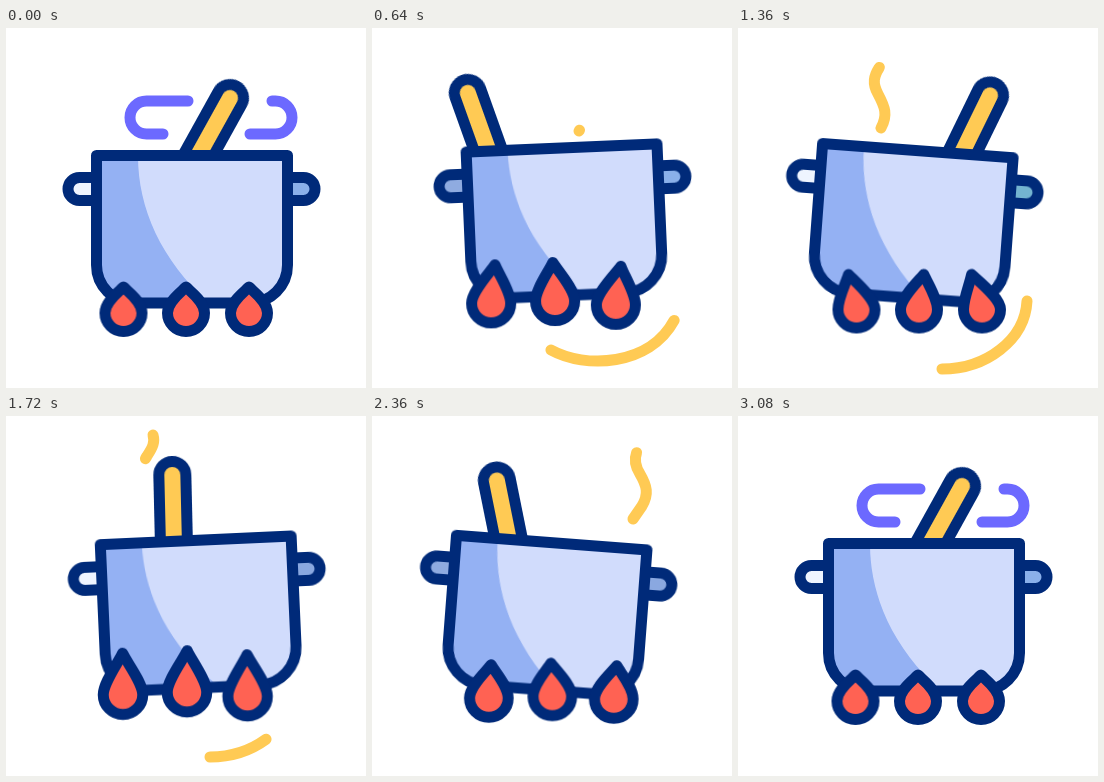
Recreate the animation shown at these times as an HTML page. Size 360 px wide and 360 px high, loop 3140 ms.

```html
<!DOCTYPE html>
<html lang="en">
<head>
<meta charset="utf-8">
<title>Cooking pot</title>
<style>
  html, body { margin: 0; width: 100%; height: 100%; overflow: hidden; background: #fff; }
  svg { display: block; width: 100vw; height: 100vh; }
  svg * {
    animation: 3140ms cubic-bezier(.37, 0, .63, 1) infinite;
  }
  .ink { stroke: #002a79; }
  .line { fill: none; stroke-dasharray: 100 200; stroke-dashoffset: 101; }
  .wisp { stroke: #6c69ff; stroke-dashoffset: 0; }
  .steam { stroke: #ffca54; animation-timing-function: linear; }

  /* Whole scene rising and settling */
  .bob { animation-name: bob; }
  @keyframes bob {
    0%, 7% { transform: translateY(0); }
    12.1% { transform: translateY(-6px); }
    29.3% { transform: translateY(-9px); }
    43.3% { transform: translateY(-4.6px); }
    66.2% { transform: translateY(-1.5px); }
    84.7% { transform: translateY(.4px); }
    94%, 100% { transform: translateY(0); }
  }

  /* Pot swings like a pendulum */
  .pot { animation-name: swing; transform-origin: 186px 45px; }
  @keyframes swing {
    0%, 12.1% { transform: rotate(0deg); }
    28% { transform: rotate(-4.6deg); }
    43.9% { transform: rotate(4.3deg); }
    59.9% { transform: rotate(-4.6deg); }
    75.8% { transform: rotate(4.4deg); }
    94%, 100% { transform: rotate(0deg); }
  }

  .left { fill: #eef4ff; animation-name: glintLeft; animation-timing-function: step-end; }
  .right { fill: #8ab0ea; animation-name: glintRight; animation-timing-function: step-end; }
  @keyframes glintLeft {
    0%, 37%, 76% { fill: #eef4ff; }
    18%, 56% { fill: #8fabe0; }
  }
  @keyframes glintRight {
    0%, 16%, 94%, 100% { fill: #8ab0ea; }
    10% { fill: #dfeaff; }
    37% { fill: #74b4d0; }
    50% { fill: #8aa8e0; }
  }

  /* Spoon: sideways stir, and the rise through the middle */
  .stir { animation-name: stir; }
  @keyframes stir {
    0%, 7%, 93.3%, 100% { transform: translate(224px, 70px) rotate(29deg); }
    22.3% { transform: translate(91px, 70px) rotate(-21.5deg); }
    43.3% { transform: translate(252px, 70px) rotate(26deg); }
    65.6% { transform: translate(89px, 70px) rotate(-26deg); }
  }
  .lift { animation-name: lift; }
  @keyframes lift {
    0%, 7%, 93.3%, 100% { transform: translateY(0); }
    14.6% { transform: translateY(-8px); }
    22.3% { transform: translateY(4px); }
    32.8% { transform: translateY(-4px); }
    43.3% { transform: translateY(2px); }
    54.5% { transform: translateY(-8px); }
    65.6% { transform: translateY(4.5px); }
    79% { transform: translateY(-7px); }
  }

  /* Lines that draw in and wipe out */
  .w1 { animation-name: w1; }
  .w2 { animation-name: w2; }
  .s1 { animation-name: s1; }
  .s2 { animation-name: s2; }
  .s3 { animation-name: s3; }
  .a1 { animation-name: a1; }
  .a2 { animation-name: a2; }
  @keyframes w1 {
    0%, 7%, 97.5%, 100% { stroke-dashoffset: 0; }
    17.2%, 86% { stroke-dashoffset: -101; }
  }
  @keyframes w2 {
    0%, 7%, 97.5%, 100% { stroke-dashoffset: 0; }
    17.2%, 86% { stroke-dashoffset: 101; }
  }
  @keyframes s1 {
    0%, 20.2% { stroke-dashoffset: 101; }
    30.8%, 32% { stroke-dashoffset: 0; }
    41.4%, 100% { stroke-dashoffset: -101; }
  }
  @keyframes s2 {
    0%, 35.5% { stroke-dashoffset: 101; }
    46%, 47.5% { stroke-dashoffset: 0; }
    58%, 100% { stroke-dashoffset: -101; }
  }
  @keyframes s3 {
    0%, 64% { stroke-dashoffset: 101; }
    76%, 76.5% { stroke-dashoffset: 0; }
    84%, 100% { stroke-dashoffset: -101; }
  }
  @keyframes a1 {
    0%, 11.5% { stroke-dashoffset: 101; }
    21% { stroke-dashoffset: 0; }
    30.6%, 100% { stroke-dashoffset: -101; }
  }
  @keyframes a2 {
    0%, 35% { stroke-dashoffset: 101; }
    43.3%, 49.7% { stroke-dashoffset: 0; }
    60%, 100% { stroke-dashoffset: -101; }
  }
</style>
</head>
<body>
<svg viewBox="0 0 360 360" stroke-width="11" stroke-linecap="round" stroke-linejoin="round">
  <defs>
    <clipPath id="body">
      <path d="M90.5 127.5H281.5V237A38 38 0 0 1 243.5 275H128.5A38 38 0 0 1 90.5 237Z"/>
    </clipPath>
  </defs>

  <path class="line steam s1" pathLength="100" d="M207 103C218 87 218 77 210 60C203 46 204 38 207 31C210 25 212 22 212 19"/>
  <path class="line steam s2" pathLength="100" d="M143 100C150 87 147 79 140 66C134 55 136 48 141 40C147 31 149 26 147 19"/>
  <path class="line steam s3" pathLength="100" d="M261 103L270 90C277 78 275 70 268 58C261 47 263 38 267 32"/>
  <path class="line steam a1" pathLength="100" d="M179 322C215 342 285 338 306 284"/>
  <path class="line steam a2" pathLength="100" d="M289 273C287 312 248 341 204 341"/>

  <g class="bob">
    <path class="line wisp w1" pathLength="100" d="M182 73H140.5A16.5 16.5 0 0 0 140.5 106H157"/>
    <path class="line wisp w2" pathLength="100" d="M266 73H269.5A16.5 16.5 0 0 1 269.5 106H244"/>

    <g class="lift">
      <g class="stir">
        <rect class="ink" x="-13.5" y="-13.5" width="27" height="108" rx="13.5" fill="#ffca54"/>
      </g>
    </g>

    <g class="pot">
      <path class="ink left" d="M90.5 149.5H73.5A11.5 11.5 0 0 0 73.5 172.5H90.5"/>
      <path class="ink right" d="M281.5 149.5H297.5A11.5 11.5 0 0 1 297.5 172.5H281.5"/>
      <g clip-path="url(#body)">
        <path fill="#d1dcfc" d="M85 122H287V280H85Z"/>
        <path fill="#94b1f3" d="M85 122H132V128C132 180 155 232 203 275V280H85Z"/>
      </g>
      <path class="ink" fill="none" d="M90.5 127.5H281.5V237A38 38 0 0 1 243.5 275H128.5A38 38 0 0 1 90.5 237Z"/>
    </g>
  </g>

  <g id="fire" class="ink" fill="#ff6253"></g>
</svg>
<script>
  const LOOP = 3140;
  const fire = document.getElementById('fire');

  // Round drop of radius r whose tip sits at (tip, -h)
  function drop(tip, h, r) {
    const c = r * .55, neck = 6 - (h - 26) * .1, lean = tip * .65;
    return `path("M${tip} ${-h} C${lean + neck} ${-h * .77} ${r} ${-r * .6} ${r} 0 ` +
      `C${r} ${c} ${c} ${r} 0 ${r} C${-c} ${r} ${-r} ${c} ${-r} 0 ` +
      `C${-r} ${-r * .6} ${lean - neck} ${-h * .77} ${tip} ${-h} Z")`;
  }

  // Shared poses; rise adds each flame's own offset when burning high
  const poses = [
    { at: 0, x: 0, y: 0, lean: 0, h: 26, r: 18.5, rise: 0 },
    { at: 220, x: 0, y: 0, lean: 0, h: 26, r: 18.5, rise: 0 },
    { at: 380, x: .5, y: -3, lean: 1.5, h: 30, r: 18.7, rise: 0 },
    { at: 920, x: 3, y: -17, lean: 6.5, h: 48, r: 20.5, rise: 1 },
    { at: 1360, x: 1, y: -3.5, lean: -8, h: 35, r: 18.5, rise: 0 },
    { at: 2080, x: -2, y: -9, lean: 7, h: 48, r: 21, rise: 1 },
    { at: 2540, x: 0, y: 0, lean: 0, h: 26, r: 18.5, rise: 0 },
    { at: LOOP, x: 0, y: 0, lean: 0, h: 26, r: 18.5, rise: 0 }
  ];

  function addFlame(x, sway, dy) {
    const flame = document.createElementNS('http://www.w3.org/2000/svg', 'path');
    fire.append(flame);
    flame.animate(poses.map(p => ({
      offset: p.at / LOOP,
      easing: 'cubic-bezier(.37, 0, .63, 1)',
      transform: `translate(${x + p.x - dy * p.rise * .6}px, ${285 + p.y + dy * p.rise}px)`,
      d: drop(p.lean * sway, p.h, p.r)
    })), { duration: LOOP, iterations: Infinity });
  }

  addFlame(117.5, 1, 0);
  addFlame(180, -.6, -5);
  addFlame(243, 1.3, 3);
</script>
</body>
</html>
```
